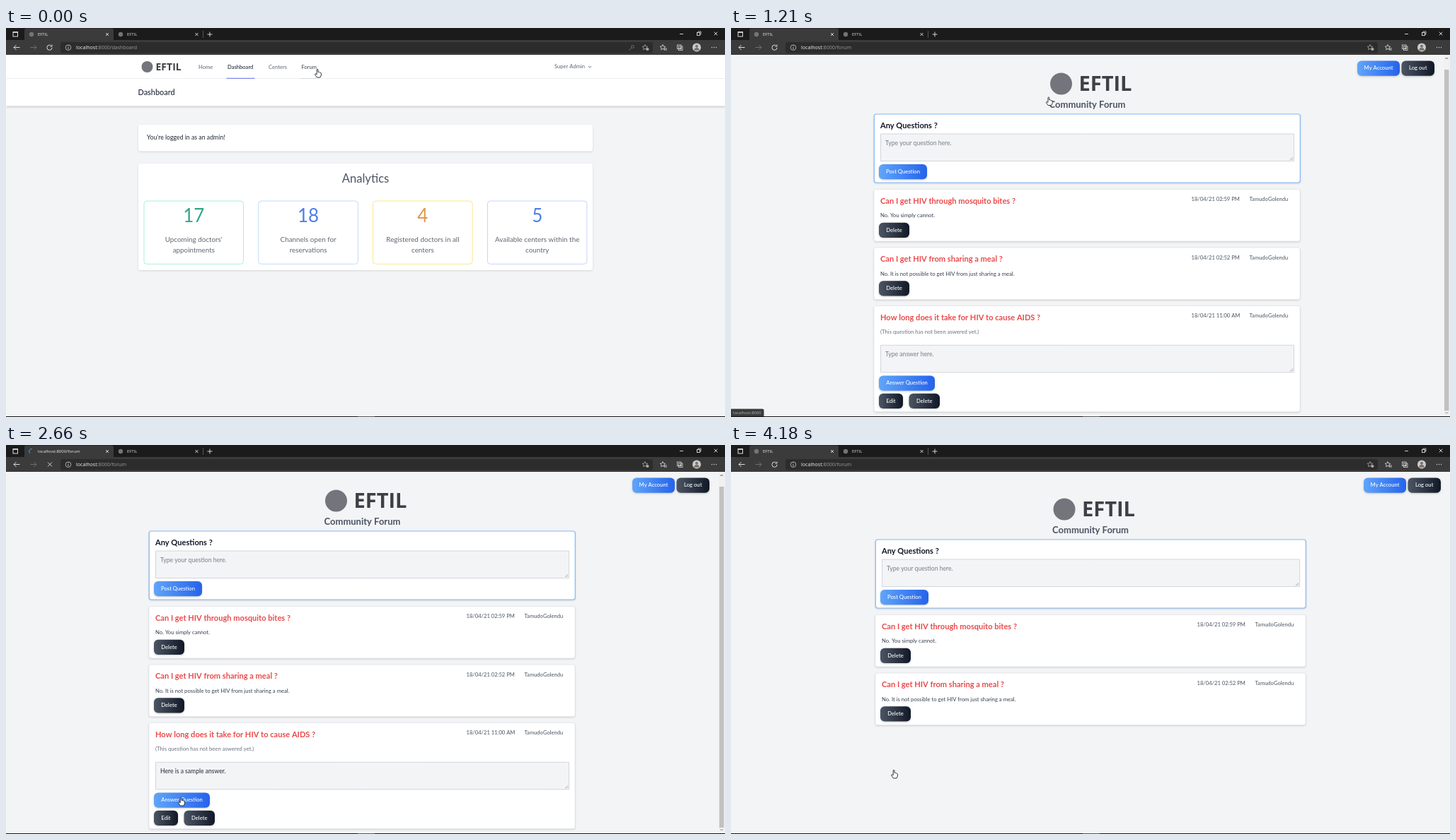
These frames come from a looping animation (1016 by 551 pixels, 4260 ms). An HTML page with a canvas:

```html
<!DOCTYPE html>
<html lang="en">
<head>
<meta charset="utf-8">
<title>Community Forum</title>
<style>
  html, body { margin: 0; width: 100%; height: 100%; overflow: hidden; background: #f3f4f6; }
  canvas { display: block; width: 100vw; height: 100vh; }
</style>
</head>
<body>
<canvas id="stage" width="1016" height="551"></canvas>
<script>
const ctx = document.getElementById('stage').getContext('2d');
const LOOP = 4260, STEP = 80.48;
const BRAND = 'EFTIL', USER = 'TamudoGolendu', ANSWER = 'Here is a sample answer.';
const BODY = 'Lato, sans-serif', UI = '"Open Sans", "Noto Sans", sans-serif';
const BLUE = ['#60a5fa', '#2563eb'], DARK = ['#4b5563', '#111827'];
const MARK = '#74747c';

// When each page becomes visible
const FORUM = 470, ANSWERED = 2850, DELETED = 3970;
// Tab spinner: start, end
const LOADS = [[150, 620], [2560, 3030], [3690, 4160]];

// Pointer path: time, x, y
const PATH = [
  [0, 441, 64], [240, 441, 64], [480, 436, 63], [960, 436, 63], [1360, 457, 125], [1410, 457, 125],
  [1600, 310, 468], [1920, 310, 468], [2000, 274, 487], [2090, 254, 513], [2400, 248, 505],
  [2880, 248, 505], [3050, 232, 388], [3210, 227, 396], [3450, 231, 466], [LOOP, 231, 466]
];

const clamp = v => Math.max(0, Math.min(1, v));
const ease = v => { v = clamp(v); return v * v * (3 - 2 * v); };
const within = (t, a, b) => t >= a && t < b;

// y is the middle of the capitals
function text(str, x, y, size, color, { weight = 400, align = 'left', font = BODY } = {}) {
  ctx.font = `${weight} ${size}px ${font}`;
  ctx.textAlign = align;
  ctx.fillStyle = color;
  ctx.fillText(str, x, y + size * 0.35);
}

function box(x, y, w, h, r, fill, { border, line = 1, shadow = 0 } = {}) {
  ctx.save();
  ctx.beginPath();
  ctx.roundRect(x, y, w, h, r);
  if (shadow) {
    ctx.shadowColor = `rgba(0,0,0,${shadow})`;
    ctx.shadowBlur = 3;
    ctx.shadowOffsetY = 1;
  }
  ctx.fillStyle = fill;
  ctx.fill();
  ctx.restore();
  if (border) {
    ctx.strokeStyle = border;
    ctx.lineWidth = line;
    ctx.stroke();
  }
}

function stroke(color, width, ...lines) {
  ctx.strokeStyle = color;
  ctx.lineWidth = width;
  ctx.beginPath();
  for (const line of lines)
    for (let i = 0; i < line.length; i += 2)
      i ? ctx.lineTo(line[i], line[i + 1]) : ctx.moveTo(line[i], line[i + 1]);
  ctx.stroke();
}

function disc(x, y, r, fill) {
  ctx.beginPath();
  ctx.arc(x, y, r, 0, 7);
  ctx.fillStyle = fill;
  ctx.fill();
}

function ring(x, y, r, color, width = 1, from = 0, to = Math.PI * 2) {
  ctx.beginPath();
  ctx.arc(x, y, r, from, to);
  ctx.strokeStyle = color;
  ctx.lineWidth = width;
  ctx.stroke();
}

function cross(x, y, r, color = '#e5e5e5') {
  stroke(color, 0.9, [x - r, y - r, x + r, y + r], [x + r, y - r, x - r, y + r]);
}

function star(x, y, color) {
  const pts = [];
  for (let i = 0; i <= 10; i++) {
    const r = i % 2 ? 1.9 : 4, a = i * Math.PI / 5 - Math.PI / 2;
    pts.push(x + r * Math.cos(a), y + r * Math.sin(a));
  }
  stroke(color, 0.8, pts);
}

function button(label, x, y, w, colors) {
  const fill = ctx.createLinearGradient(x, 0, x + w, 0);
  colors.forEach((c, i) => fill.addColorStop(i, c));
  box(x, y, w, 21.2, 6, fill, { shadow: 0.2 });
  text(label, x + w / 2, y + 10.3, 7.65, '#fff', { weight: 500, align: 'center' });
}

function textarea(x, y, w, str, color, focused) {
  box(x + 0.5, y + 0.5, w - 1, 38.5, 0, '#f3f4f6',
    { border: focused ? '#3567d6' : '#d3d6db', line: focused ? 1.6 : 1 });
  text(str, x + 7, y + 13, 8.6, color);
  if (focused) {
    const end = x + 7.7 + ctx.measureText(str).width;
    stroke('#111', 0.8, [end, y + 8, end, y + 19]);
  }
  const r = x + w - 2, b = y + 37.5;
  stroke('#8b8f96', 0.7, [r - 4, b, r, b - 4], [r - 1.7, b, r, b - 1.7]);
}

function drawChrome(s) {
  ctx.fillStyle = '#1b1b1b';
  ctx.fillRect(0, 0, 1016, 18);
  box(26, 0.5, 126, 20, [3, 3, 0, 0], '#3b3b3b');
  ctx.fillStyle = '#3b3b3b';
  ctx.fillRect(0, 17, 1016, 21);
  box(77, 20, 837, 15.5, 3, '#2c2c2c');

  ctx.strokeStyle = '#ddd';
  ctx.lineWidth = 1;
  ctx.strokeRect(10, 5.5, 6.5, 6.5);
  stroke('#ddd', 1.6, [10, 6, 16.5, 6]);
  if (s.loading) ring(36, 9, 3.3, '#5aa9ec', 1, 2.2 + s.spin, 5 + s.spin);
  else disc(36, 9, 3.2, MARK);
  disc(162, 9, 3.2, MARK);
  text(s.tabTitle, 45, 8.8, 5.95, '#eee', { font: UI });
  text(BRAND, 171, 8.8, 5.95, '#ddd', { font: UI });
  cross(143, 9, 2);
  cross(269.5, 9, 2);
  stroke('#666', 0.8, [278.5, 4, 278.5, 14]);
  stroke('#e5e5e5', 0.9, [284.5, 9, 291.5, 9], [288, 5.5, 288, 12.5]);

  stroke('#ddd', 0.9, [952, 8.5, 957, 8.5]);
  ctx.strokeRect(976.5, 6.5, 4, 4);
  stroke('#ddd', 0.8, [978, 6, 978, 5, 982, 5, 982, 9, 981, 9]);
  cross(1003, 8, 2.3);

  stroke('#ddd', 1, [19.5, 27.5, 11, 27.5], [14.5, 24, 11, 27.5, 14.5, 31]);
  stroke('#6f6f6f', 1, [34.5, 27.5, 43, 27.5], [39.5, 24, 43, 27.5, 39.5, 31]);
  if (s.loading) cross(62, 27.5, 3, '#ddd');
  else {
    ring(61.5, 27.7, 3.6, '#ddd', 1, 0, 5.3);
    stroke('#ddd', 1, [65, 23.5, 65, 26, 62.3, 26]);
  }
  ring(88, 27.7, 3.8, '#ccc', 0.8);
  stroke('#ccc', 0.9, [88, 27, 88, 30], [88, 25.2, 88, 26]);
  text('localhost', 99, 27.3, 7.1, '#f0f0f0', { font: UI });
  const hostEnd = 99 + ctx.measureText('localhost').width;
  text(':8000/' + s.route, hostEnd, 27.3, 7.1, '#9b9b9b', { font: UI });

  if (s.route === 'dashboard') {
    ring(885.5, 26.5, 1.9, '#777', 0.9);
    stroke('#777', 0.9, [884, 28, 880.5, 31.5]);
  }
  star(903, 27.5, '#aaa');
  disc(906.5, 30, 2, '#aaa');
  star(928, 27.5, '#ddd');
  stroke('#ddd', 0.8, [930, 29, 934, 29], [930, 31, 934, 31]);
  ctx.strokeStyle = '#ddd';
  ctx.strokeRect(948.5, 24, 5.5, 5.5);
  ctx.strokeRect(950.5, 26, 5.5, 5.5);
  stroke('#ddd', 0.8, [953.3, 27, 953.3, 30.5], [951.5, 28.8, 955, 28.8]);
  disc(976, 27.5, 6, '#cfcac6');
  disc(976, 25.8, 2, '#77716d');
  ctx.beginPath();
  ctx.arc(976, 31.7, 3.7, Math.PI, 0);
  ctx.fill();
  for (const x of [997.5, 1000.5, 1003.5]) disc(x, 27.5, 0.7, '#ddd');
}

function drawDashboard() {
  box(0, 38, 1016, 72.5, 0, '#fff', { shadow: 0.18 });
  stroke('#eceef1', 1, [0, 71.5, 1016, 71.5]);
  disc(199.5, 55, 8, MARK);
  text(BRAND, 211.5, 55, 14, '#3f3f46', { weight: 700, font: UI });
  text('Home', 272, 55, 7.6, '#6b7280', { weight: 500 });
  text('Dashboard', 313, 55, 7.6, '#1f2937', { weight: 500 });
  text('Centers', 371, 55, 7.6, '#6b7280', { weight: 500 });
  text('Forum', 417.5, 55, 7.6, '#4b5563', { weight: 500 });
  stroke('#7c86ee', 1.2, [311.5, 71.4, 351.5, 71.4]);
  stroke('#d5d8dd', 1, [416, 71.5, 441, 71.5]);
  text('Super Admin', 775, 54.8, 7.6, '#6b7280', { weight: 500 });
  stroke('#6b7280', 1, [823, 54, 825, 56, 827, 54]);
  text('Dashboard', 186.5, 91.2, 10.9, '#1f2937', { weight: 500 });

  box(187, 137, 642, 37.5, 3, '#fff', { shadow: 0.13 });
  text("You're logged in as an admin!", 199, 155.2, 8.75, '#1f2937');
  box(187, 192, 642, 151, 3, '#fff', { shadow: 0.13 });
  text('Analytics', 508, 213.5, 16.6, '#4b5563', { align: 'center' });
  const stats = [
    ['17', '#32a587', '#a7f3d0', "Upcoming doctors'", 'appointments'],
    ['18', '#4d7fe9', '#bfdbfe', 'Channels open for', 'reservations'],
    ['4', '#df9849', '#fde68a', 'Registered doctors in all', 'centers'],
    ['5', '#4d7fe9', '#c7d2fe', 'Available centers within the', 'country']
  ];
  stats.forEach(([count, color, border, ...label], i) => {
    const x = 195 + i * 161.8, mid = x + 70.3;
    box(x, 245, 140.5, 89.3, 4, '#fff', { border });
    text(count, mid, 266, 26, color, { align: 'center' });
    label.forEach((line, row) =>
      text(line, mid, 299.3 + row * 14.8, 9.85, '#5f6773', { align: 'center' }));
  });
}

function card(x, right, y, h, title, date) {
  box(x, y, right - x, h, 3, '#fff', { border: '#e6e8eb', line: 0.8, shadow: 0.2 });
  text(title, x + 9, y + 16.2, 11.08, '#ea4a4a', { weight: 700 });
  text('18/04/21 ' + date, right - 153.5, y + 14.2, 7.6, '#4b5563');
  text(USER, right - 71.5, y + 14.2, 7.6, '#4b5563');
}

function drawForum(s) {
  const width = s.answered ? 1016 : 1007;
  const x = Math.round(width * 0.2 + 0.8), right = Math.round(width * 0.8 - 1.3), mid = width / 2;
  ctx.save();
  ctx.translate(0, -s.scroll);
  disc(mid - 37, 91, 15.5, MARK);
  text(BRAND, mid - 12, 91, 29, '#3f3f46', { weight: 700, font: UI });
  text('Community Forum', mid, 120.5, 13, '#4b5563', { weight: 700, align: 'center' });

  box(x + 0.3, 134, right - x, 97, 3, '#fff', { border: '#85b9f5', line: 1.2, shadow: 0.2 });
  text('Any Questions ?', x + 9, 149.7, 11.1, '#111827', { weight: 700 });
  textarea(x + 9, 161.5, right - x - 17, 'Type your question here.', '#787d86');
  button('Post Question', x + 7, 205, 68, BLUE);

  card(x, right, 240.5, 73.5, 'Can I get HIV through mosquito bites ?', '02:59 PM');
  text('No. You simply cannot.', x + 9, 277.7, 7.7, '#374151');
  button('Delete', x + 7, 287.8, 43, DARK);
  card(x, right, 323, 73.5, 'Can I get HIV from sharing a meal ?', '02:52 PM');
  text('No. It is not possible to get HIV from just sharing a meal.', x + 9, 360.2, 7.7, '#374151');
  button('Delete', x + 7, 370.2, 43, DARK);

  if (!s.deleted) {
    card(x, right, 405.5, s.answered ? 73.5 : 150, 'How long does it take for HIV to cause AIDS ?', '11:00 AM');
    if (s.answered) {
      text(ANSWER, x + 9, 442.7, 7.7, '#374151');
      button('Delete', x + 7, 452.7, 43, DARK);
    } else {
      text('(This question has not been aswered yet.)', x + 9, 442.7, 7.7, '#6b7280');
      const typed = ANSWER.slice(0, s.typed);
      textarea(x + 9, 460.8, right - x - 17, typed || 'Type answer here.',
        typed ? '#1f2937' : '#787d86', s.focused);
      button('Answer Question', x + 7, 504.5, 79, BLUE);
      button('Edit', x + 7, 529.7, 34, DARK);
      button('Delete', x + 49.5, 529.7, 43.5, DARK);
    }
  }
  ctx.restore();

  button('My Account', width - 122, 46.5, 60, BLUE);
  button('Log out', width - 59.5, 46.5, 46.5, DARK);
  if (!s.answered) {
    ctx.fillStyle = '#f1f1f1';
    ctx.fillRect(1007, 38, 9, 513);
    ctx.fillStyle = '#c1c1c1';
    ctx.fillRect(1008, 47 + s.scroll, 6.5, 483);
    stroke('#555', 1, [1009.3, 44, 1011.3, 42, 1013.3, 44]);
    stroke('#888', 1, [1009.3, 544, 1011.3, 546, 1013.3, 544]);
  }
}

function drawStatus(label, w, alpha) {
  ctx.globalAlpha = alpha;
  box(0, 539.5, w, 12, [0, 2, 0, 0], '#3b3b3b');
  text(label, 3, 545, 5.9, '#b5b5b5', { font: UI });
  ctx.globalAlpha = 1;
}

function drawPointer(kind, x, y) {
  ctx.save();
  ctx.translate(x, y);
  ctx.lineJoin = 'round';
  if (kind === 'beam') {
    stroke('#333', 0.8, [0, -4, 0, 4], [-2, -4.3, 2, -4.3], [-2, 4.3, 2, 4.3]);
  } else {
    const shape = new Path2D(kind === 'hand'
      ? 'M-1.8 1V-5Q-1 -6.7 0 -5V-1.6Q1 -2.4 1.6 -1.2Q2.6 -1.8 3 -.7Q4.4 -1 4.4 .5V3L3 6H-1.6L-4.5 1.8Q-4.4 -.2 -1.8 1.7Z'
      : 'M-3 -6V4L-.8 2L.8 5.6L2.3 5L.8 1.5H4Z');
    ctx.fillStyle = '#fff';
    ctx.fill(shape);
    ctx.strokeStyle = '#222';
    ctx.lineWidth = 0.9;
    ctx.stroke(shape);
  }
  ctx.restore();
}

function pointerAt(t) {
  const i = PATH.findIndex(p => p[0] > t), a = PATH[i - 1], b = PATH[i];
  const k = ease((t - a[0]) / (b[0] - a[0]));
  return [a[1] + (b[1] - a[1]) * k, a[2] + (b[2] - a[2]) * k];
}

function heldTime(t) {
  if (t < 880) return Math.min(720, Math.floor(t / 80) * 80);
  return 880 + Math.floor((t - 880) / STEP) * STEP;
}

function render(t) {
  const waiting = [FORUM, ANSWERED, DELETED].some((end, i) => within(t, LOADS[i][0], end));
  const answered = t >= ANSWERED;
  const state = {
    answered,
    deleted: t >= DELETED,
    route: t < FORUM ? 'dashboard' : 'forum',
    loading: LOADS.some(([from, to]) => within(t, from, to)),
    spin: (t - 2656.6) / 110,
    tabTitle: waiting ? 'localhost:8000/forum' : BRAND,
    scroll: answered ? 0 : 12 * ease((t - 1040) / 160),
    focused: within(t, 1600, 2440),
    typed: Math.floor(ANSWER.length * clamp((t - 1640) / 280))
  };

  ctx.fillStyle = '#f3f4f6';
  ctx.fillRect(0, 0, 1016, 551);
  if (state.route === 'dashboard') drawDashboard();
  else drawForum(state);
  drawChrome(state);

  if (within(t, 70, 700)) drawStatus('localhost:8000/forum', 67, t < 600 ? 1 : 0.4);
  if (within(t, 1190, 1500)) drawStatus('localhost:8000', 46.5, t < 1400 ? 1 : 0.4);
  ctx.fillStyle = '#161616';
  ctx.fillRect(0, 550, 1016, 1);
  ctx.fillStyle = '#555';
  ctx.fillRect(497, 550, 24, 1);

  const kind = within(t, 1400, 1590) ? 'arrow' : within(t, 1590, 2060) ? 'beam' : 'hand';
  drawPointer(kind, ...pointerAt(t));
}

function tick() {
  render(heldTime(performance.now() % LOOP));
  requestAnimationFrame(tick);
}
tick();
</script>
</body>
</html>
```
